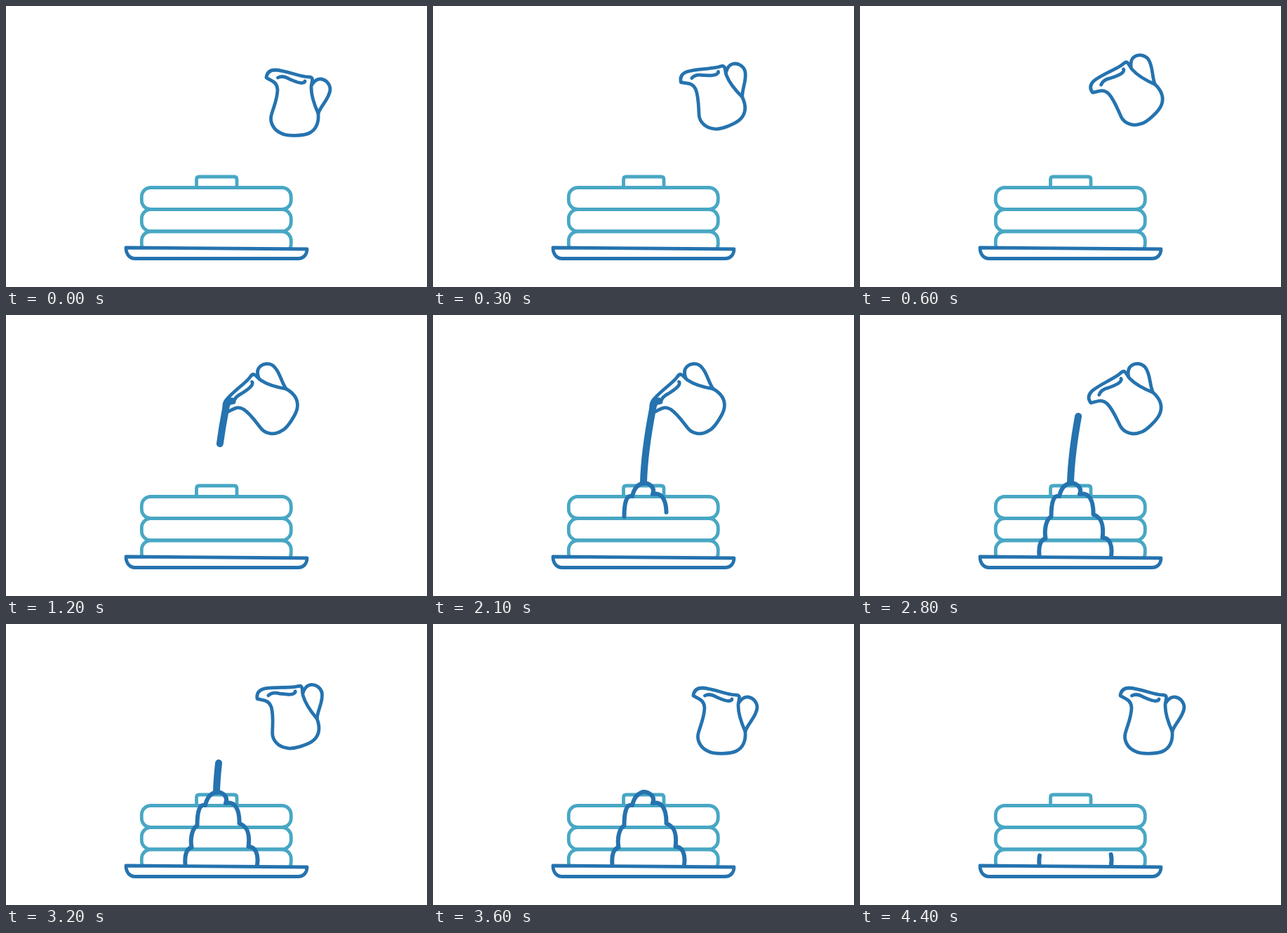
An HTML page that plays this animation: 600x400 px, repeating every 4500 ms.

```html
<!DOCTYPE html>
<html lang="en">
<head>
<meta charset="utf-8">
<title>Pancakes and syrup</title>
<style>
  html, body { margin: 0; height: 100%; overflow: hidden; background: #fff; }
  svg { display: block; width: 600px; height: 400px; }
  svg * { fill: none; stroke-linecap: round; stroke-linejoin: round; }
  .cake { stroke: #48a7c4; stroke-width: 4.8; }
  .blue { stroke: #2573af; stroke-width: 4.8; }
  #plate { fill: #fff; }
  #left, #right { stroke-width: 6; }
  #stream { stroke-width: 10; }
</style>
</head>
<body>
<svg viewBox="0 0 600 400">
  <g class="cake">
    <path d="M271.5 257V247Q271.5 243 275.5 243H325Q329 243 329 247V257"/>
    <rect x="193.3" y="258.5" width="213" height="31" rx="13"/>
    <rect x="193.3" y="289.7" width="213" height="31" rx="13"/>
    <rect x="193.3" y="321" width="213" height="31" rx="13"/>
  </g>
  <g class="blue">
    <path id="left" d="M300 239C291 241 286 249 284 258C276 256 272.5 266 272.5 287C266 290 262 304 264.5 318C257 320 254.5 330 255.5 343"/>
    <path id="right" d="M300 239C309 239 317 246 313 255C326 252 333 263 332.5 284C344 288 348 298 345.5 317C356 317 360 328 358 343"/>
    <path id="plate" d="M171 344L429 346C429 354 424 359.5 416 359.5H184C176 359.5 171 353 171 344Z"/>
    <g id="jug">
      <path d="M371 102C372 94 377 91 384 91C398 92 412 98 426 100.5C431 101.5 436 100 436.5 104C437 108 435 110 435 116C435 128 440 142 445 153C446 166 442 176 432 181C424 185 400 186 392 181C380 176 376 164 378 156C381 145 387 132 387 119C386 107 378 107 371 102Z"/>
      <path d="M436 112C440 106 444 103.5 449 104C457 105 462 112 462 119C461 132 449 141 445 153"/>
      <path d="M387.5 102C393 99 399 101 404 104C411 107 417 110 422 109.5C425 109 426 108.5 426 107"/>
    </g>
    <path id="stream" d="M322 122.5C316 122 314 127 313 134C307 165 301 205 300 238"/>
  </g>
</svg>
<script>
const LOOP = 4500, STEP = 100;
const $ = id => document.getElementById(id);
const ramp = (t, from, to) => Math.min(1, Math.max(0, (t - from) / (to - from)));

// Shows only the part of a path between the fractions a and b.
function trim(id, a, b) {
  const path = $(id), len = path.getTotalLength();
  path.style.visibility = b > a ? 'visible' : 'hidden';
  path.style.strokeDasharray = `${(b - a) * len} ${len + 20}`;
  path.style.strokeDashoffset = -a * len;
}

function draw(t) {
  const tilt = ramp(t, 0, 800) - ramp(t, 2630, 3430);
  $('jug').setAttribute('transform',
    `translate(${5.2 * tilt} ${60.7 * tilt}) rotate(${-56 * tilt} 317.5 146.6)`);
  trim('stream', ramp(t, 2600, 3500), ramp(t, 720, 1600));
  const drained = ramp(t, 3600, 4500);
  trim('left', drained, ramp(t, 1600, 2610));
  trim('right', drained, ramp(t, 1600, 2700));
}

const start = performance.now();
function tick() {
  const t = (performance.now() - start) % LOOP;
  draw(Math.floor(t / STEP) * STEP);
  requestAnimationFrame(tick);
}
tick();
</script>
</body>
</html>
```
